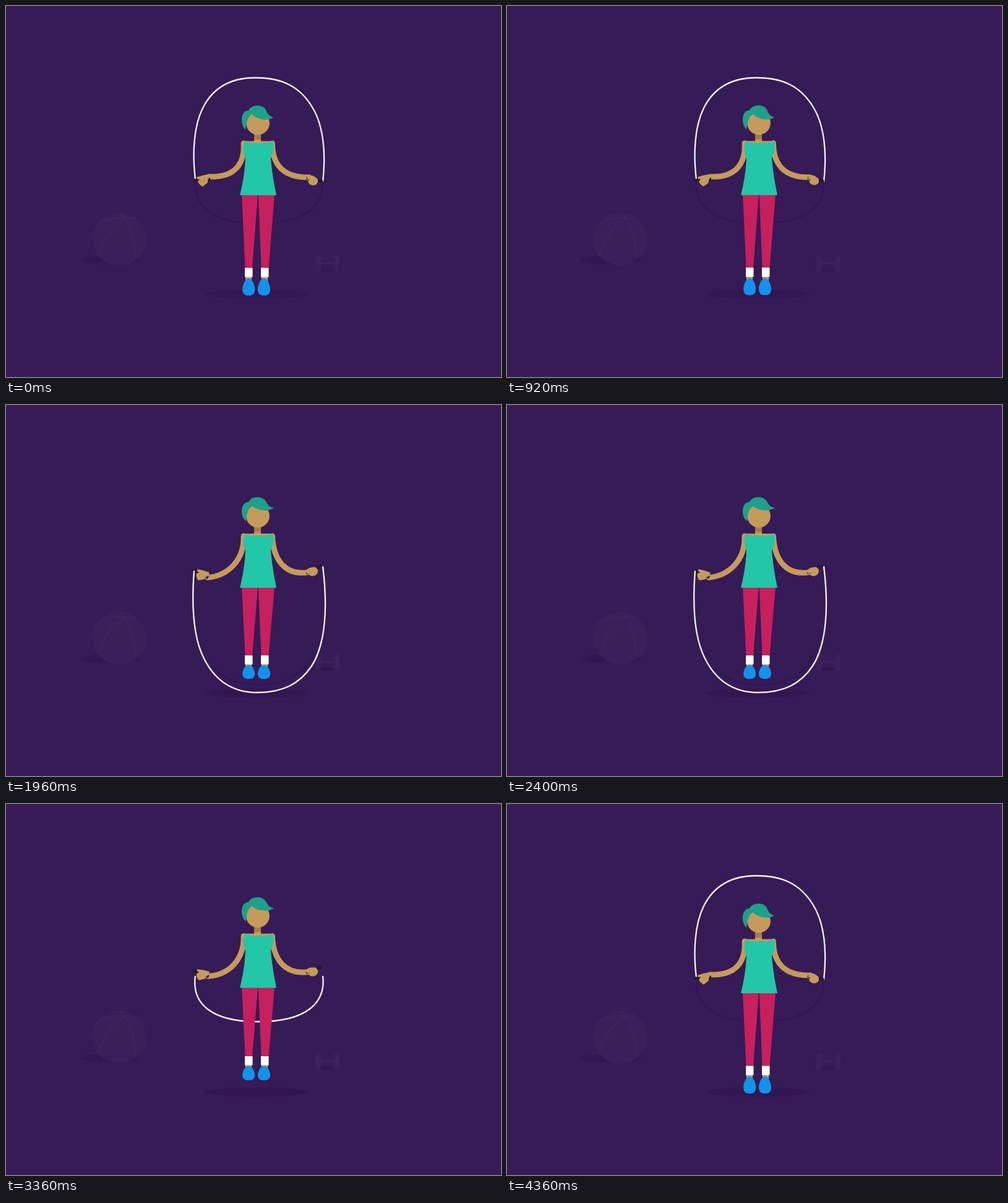
These frames come from a looping animation (800 px wide and 600 px high, 4400 ms). An HTML page:

```html
<!DOCTYPE html>
<html lang="en">
<head>
<meta charset="utf-8">
<title>Jump rope</title>
<style>
  html, body { margin: 0; width: 100%; height: 100%; overflow: hidden; background: #361b57; }
  svg { display: block; width: 100vw; height: 100vh; }
  .skin { fill: #c49b5a; }
  .arm { fill: none; stroke: #c49b5a; stroke-width: 8.8; stroke-linecap: round; }
  .handle { stroke: #211b24; stroke-width: 4.5; }
  .rope { fill: none; stroke: #f7f4f8; stroke-width: 2.3; }
  .ghost { fill: none; stroke: #301650; stroke-width: 2.2; }
  .seam { fill: none; stroke: #422861; stroke-width: 1.2; }
  .floor { fill: #311751; }
  .gear { fill: #3b215a; }
  .shirt { fill: #22c7a7; }
  .hair { fill: #1ea089; }
  .pants { fill: #c81f5d; }
  .shoe { fill: #1292eb; }
</style>
</head>
<body>
<svg viewBox="0 0 800 600">
  <ellipse class="floor" cx="168" cy="411" rx="48" ry="7"/>
  <ellipse cx="183" cy="377" rx="44" ry="42.5" fill="#3a1f59"/>
  <path class="seam" d="M145 356Q158 343 183 342.500L209 343M184 335Q189 337 192 343Q160 364 149 404M192 343Q209 368 208 407"/>
  <ellipse class="floor" cx="520" cy="427" rx="15" ry="3"/>
  <g class="gear">
    <rect x="500" y="403" width="9" height="26" rx="4"/>
    <rect x="530" y="403" width="9" height="26" rx="4"/>
    <rect x="508" y="414" width="23" height="4"/>
  </g>
  <ellipse class="floor" cx="405" cy="466" rx="83" ry="7.500"/>
  <path class="ghost" id="ghost"/>
  <path class="rope" id="ropeBack"/>

  <path class="skin" id="ankles"/>
  <path class="shoe" id="shoes"/>
  <path class="pants" id="pants"/>
  <path fill="#fff" id="socks"/>
  <path class="arm" id="armL"/>
  <path class="arm" id="armR"/>
  <g id="handL">
    <path class="handle" d="M-15 1L12 -1"/>
    <path class="skin" d="M-10 -4Q-2 -7 10 -9L10 -3L8 1Q9 5 5 7L0 11Q-5 9 -8 3L-5 -1L-9 -1Z"/>
  </g>
  <g id="handR">
    <path class="handle" d="M-11 -5L15 1"/>
    <path class="skin" d="M-10 -9Q-1 -10 3 -6Q8 -4 7 2Q5 7 -1 7Q-8 6 -9 0L-6 -2L-10 -3Z"/>
  </g>
  <g id="neck" class="skin">
    <rect x="401" y="203" width="11" height="20"/>
    <rect x="401" y="203" width="11" height="13" fill="#a27d48"/>
    <rect x="385" y="218.500" width="47" height="5"/>
  </g>
  <path class="shirt" id="shirt"/>
  <circle class="skin" id="head" cx="407" r="18.900"/>
  <path class="hair" id="hair"/>
  <path class="rope" id="ropeFront"/>
</svg>
<script>
const LOOP = 4400, STEP = 40, PERIOD = 435;
const $ = id => document.getElementById(id);
const draw = (id, d) => $(id).setAttribute("d", d);

// Blend two paths that share one structure
const mix = (a, b, k) => {
  const to = b.match(/-?[\d.]+/g).map(Number);
  let i = 0;
  return a.replace(/-?[\d.]+/g, n => (+n + (to[i++] - n) * k).toFixed(2));
};
const lerp = (a, b, k) => a + (b - a) * k;

const TOP = "M306 281C301 240 303 195 318 165C334 133 362 116 403 116C446 116 474 130 494 162C514 193 517 240 512 284";
const NECK = "M305 272C299 262 299 253 301 246C306 224 345 205 407 205C465 205 512 224 518 246C520 254 517 264 512 273";
const LOW = "M306 278C300 320 328 352 407 352C488 352 517 320 512 278";
const BOTTOM = "M304 268C300 320 302 375 320 410C338 446 366 465 406 465C446 465 474 452 494 422C517 386 520 325 512 261";
const TOP_GHOST = "M306 286C304 318 328 352 407 352C488 352 513 320 511 288";
const BOTTOM_GHOST = "M336 427C368 462 468 466 497 405";

const POSES = [
  { rope: TOP, ghost: TOP_GHOST },
  { rope: NECK, front: true, width: 1.7 },
  { rope: LOW, front: true },
  { rope: BOTTOM, front: true, ghost: BOTTOM_GHOST },
  { rope: LOW },
  { rope: NECK, width: 1.7 }
];

const ARM_L = ["M384 222C386 254 371 278 328 276", "M384 212C385 250 360 276 326 279"];
const ARM_R = ["M430.5 222C430 256 448 278 490 277", "M430.5 212C432 251 452 278 492 270"];
const SHIRT = [
  "M385 219.500Q408 224.500 432 219.500Q434 236 428 246Q430 274 437 306L378 306Q386 274 387 246Q381 236 385 219.500Z",
  "M385 209Q408 214 432 209Q434 225 428 235Q430 263 437 295.500L378 295.500Q386 263 387 235Q381 225 385 209Z"
];
const HAIR = [
  "M392 169C396 159 415 158 420 168C422 174 426 179 432 180C426 186 407 185 397 175C389 181 388 192 387 200C383 196 381 191 381 184C381 175 385 169 392 169Z",
  "M392 157C396 147 414 146 420 156C423 162 427 166 433 166C426 172 409 173 397 163C389 169 389 180 388 188C383 184 381 179 381 172C381 163 385 157 392 157Z"
];

// Height of the jump, 0 on the floor and 1 at the peak
function lift(p) {
  if (p < 48 || p > 381) return 0;
  if (p < 220) return 1 - ((220 - p) / 172) ** 2;
  if (p < 272) return 1;
  return 1 - ((p - 272) / 109) ** 2;
}

function drawLegs(k) {
  const hip = lerp(305, 294.5, k), cuff = lerp(423.5, 405, k);
  const ankle = lerp(438.5, 419.5, k), shoeTop = lerp(440.5, 420.5, k), sole = lerp(468.2, 442.9, k);
  const box = (x, w, a, b) => `M${x} ${a}h${w}V${b}h${-w}Z`;
  const shoe = x => {
    const h = sole - shoeTop, mid = shoeTop + h * 0.62;
    return `M${x} ${shoeTop}C${x + 6} ${shoeTop} ${x + 10} ${mid - 5} ${x + 10} ${mid}` +
      `C${x + 10} ${sole - 2} ${x + 6} ${sole} ${x} ${sole}` +
      `C${x - 6} ${sole} ${x - 10} ${sole - 2} ${x - 10} ${mid}` +
      `C${x - 10} ${mid - 5} ${x - 6} ${shoeTop} ${x} ${shoeTop}Z`;
  };
  draw("pants", `M381 ${hip}H407L398 ${cuff}H386.500ZM407.800 ${hip}H434L424.500 ${cuff}H412.500Z`);
  draw("socks", box(386, 12.5, cuff, ankle) + box(412, 12.5, cuff, ankle));
  draw("ankles", box(387, 10, ankle - 1, shoeTop + 6) + box(413, 10, ankle - 1, shoeTop + 6));
  draw("shoes", shoe(392.2) + shoe(417));
}

function render(time) {
  const t = Math.floor((time % LOOP) / STEP) * STEP;
  const phase = t % PERIOD, k = lift(phase);
  const pose = POSES[Math.floor((phase + 6) / PERIOD * 6) % 6];

  draw("ghost", pose.ghost || "");
  draw("ropeBack", pose.front ? "" : pose.rope);
  draw("ropeFront", pose.front ? pose.rope : "");
  for (const id of ["ropeBack", "ropeFront"]) $(id).style.strokeWidth = pose.width || 2.3;

  drawLegs(k);
  draw("armL", mix(...ARM_L, k));
  draw("armR", mix(...ARM_R, k));
  draw("shirt", mix(...SHIRT, k));
  draw("hair", mix(...HAIR, k));
  $("head").setAttribute("cy", lerp(189.5, 179.5, k));
  $("neck").setAttribute("transform", `translate(0 ${-10.5 * k})`);
  $("handL").setAttribute("transform", `translate(${lerp(318, 316, k)} ${lerp(281, 274, k)}) rotate(${30 * k})`);
  $("handR").setAttribute("transform", `translate(497 ${lerp(283, 269, k)}) rotate(${-40 * k})`);
}

const start = performance.now();
function tick() {
  render(performance.now() - start);
  requestAnimationFrame(tick);
}
tick();
</script>
</body>
</html>
```
